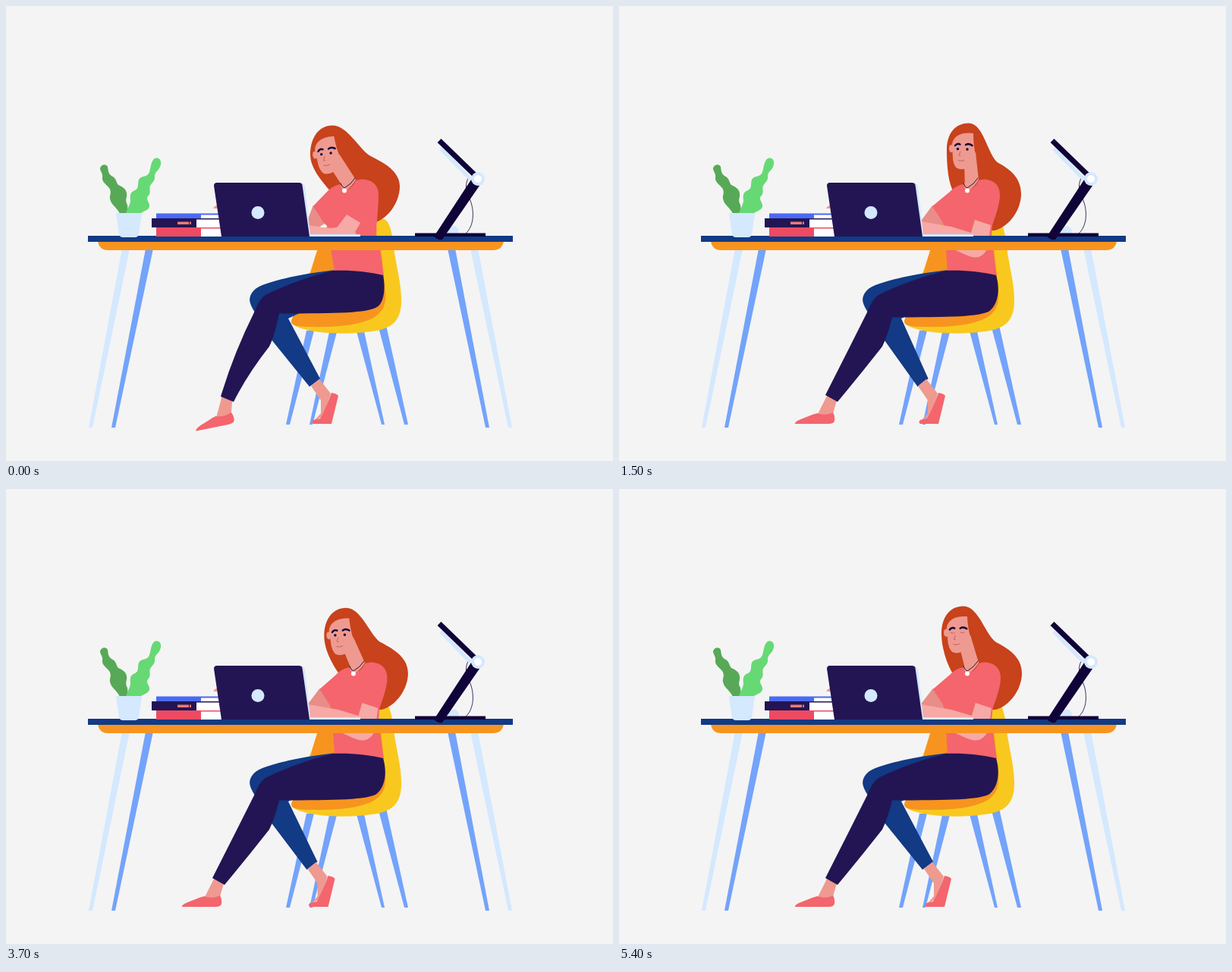
Animation of 800x600 px, one loop 5.5 s. Source, as an HTML page:

```html
<!DOCTYPE html>
<html lang="en">
<head>
<meta charset="utf-8">
<title>Working at a desk</title>
<style>
  html, body { margin: 0; width: 100%; height: 100%; overflow: hidden; background: #f4f4f4; }
  svg { display: block; width: 100vw; height: 100vh; }
  .navy { fill: #231553; }
  .ink { fill: #0f0338; }
  .blue { fill: #123a85; }
  .sky { fill: #73a3fb; }
  .pale { fill: #d4e8fe; }
  .orange { fill: #f7941f; }
  .yellow { fill: #f9c81f; }
  .coral { fill: #f4656d; }
  .skin { fill: #ee9a90; }
  .shade { fill: #e88d87; }
  .light { fill: #f6a9a6; }
  .hair { fill: #c8421b; }
  .white { fill: #fff; }
  .line { fill: none; stroke: #0f0338; stroke-linecap: round; }
  .thin { fill: none; stroke: #c0605f; stroke-width: .9; stroke-linecap: round; }
</style>
</head>
<body>
<svg viewBox="0 0 800 600">
  <!-- chair -->
  <g class="sky">
    <path d="M396 428H406L374 552H369Z"/>
    <path d="M426 430H436L404 552H400Z"/>
    <path d="M462 429H472L499 552H495Z"/>
    <path d="M491 424L501 421L530 552H525Z"/>
  </g>
  <path class="yellow" d="M497 281C506 282 509 300 511 318C514 342 521 365 521 388C521 412 512 423 490 428C460 433 420 433 396 427C384 424 377 421 376 416L425 286L470 280Z"/>
  <path class="orange" d="M426 284C418 300 408 325 402 350L381 405Q374 415 377 419Q381 423 400 423C440 424 470 420 486 410C498 402 501 392 500 378L494 318L440 290Z"/>

  <!-- woman -->
  <path class="hair" id="hair"/>
  <path class="blue" id="backLeg"/>
  <g id="backFoot">
    <path class="skin" d="M402 501L413 492L428 511L419 540L405 548L415 537V520Z"/>
    <path class="coral" d="M429 510Q436 511 438 514L429 551H405Q402 549 405 546L414 544Q422 530 429 510Z"/>
  </g>
  <path class="skin" id="neck"/>
  <path class="shade" id="farArm"/>
  <path class="coral" id="shirt"/>
  <path class="skin" id="collar"/>
  <path class="light" id="nearArm"/>
  <g id="frontFoot">
    <path class="skin" d="M-6 -4L7 2L1 23Q-9 28 -18 20Z"/>
    <path class="coral" d="M-48 33Q-49 30 -38 26C-28 22 -23 20 -19 19Q-8 23 2 18Q5 23 4 29Q3 33 -4 33Z"/>
  </g>
  <path class="navy" id="frontLeg"/>
  <g id="head">
    <ellipse class="skin" cx="-15" cy="0" rx="3" ry="5"/>
    <path class="skin" d="M14 -20C0 -22 -12 -18 -14 -6L-13 14Q-11 27 -4 27Q3 28 10 23L17 8Q14 -4 14 -20Z"/>
    <path class="line" stroke-width="2.4" d="M-10 -4Q-7 -7.5 -3.5 -5.5M4 -5Q8 -7.5 12.5 -4"/>
    <g id="open" class="ink"><circle cx="-6.500" cy="0.500" r="1.700"/><circle cx="6" cy="1" r="1.700"/></g>
    <path id="shut" class="thin" d="M-9 0Q-7 1.500 -4 .5M4 .5Q6 2 9 .5"/>
    <path class="thin" d="M-3 4L-5 9L-3 9.500M-6 15.500Q-2 17.500 2 15.500"/>
  </g>
  <g id="pendant">
    <path class="line" stroke-width=".9" d="M-5 -6Q-3 -1 0 0Q9 -5 14 -13"/>
    <circle class="white" r="3" cy="3.500"/>
  </g>

  <!-- table -->
  <g class="pale">
    <path d="M153 320H163L114 556H109Z"/>
    <path d="M612 320H622L667 556H662Z"/>
  </g>
  <g class="sky">
    <path d="M184 320H194L144 556H139Z"/>
    <path d="M582 320H592L637 556H632Z"/>
  </g>
  <path class="orange" d="M121 310H656Q654 322 642 322H134Q123 322 121 310Z"/>
  <path class="blue" d="M108 303H668V311H108Z"/>

  <!-- plant -->
  <path fill="#58a957" d="M150 274C147 266 138 262 137 254C136 249 140 246 136 240C132 235 126 232 127 226C128 222 125 219 124 215C124 209 132 207 134 212C135 217 134 220 139 224C146 227 145 233 148 236C152 238 158 240 159 247C160 253 156 256 160 262L161 274Z"/>
  <path fill="#66d974" d="M158 274C160 266 164 262 164 256C163 250 164 245 170 243C176 240 173 234 175 229C178 223 185 226 188 221C191 217 190 205 196 201C203 199 206 205 203 212C201 217 196 219 196 224C197 231 192 233 190 237C188 241 192 246 187 251C184 254 188 258 189 262C190 269 182 270 176 274Z"/>
  <path class="pale" d="M145 273H179L175 301Q174 305 170 305H154Q150 305 149 301Z"/>

  <!-- books -->
  <path class="white" d="M250 275H286V304H250Z"/>
  <path fill="#4a6af5" d="M198 273.500H286V275.500H257V280.500H198Z"/>
  <path class="navy" d="M192 280H286V281.500H251V292H192Z"/>
  <path fill="#f07a72" d="M226 284.500H241V288H226ZM242 284.500H244V288H242Z"/>
  <path fill="#ee4a62" d="M198 292H286V293.500H257V304H198Z"/>
  <path class="skin" d="M273 267Q276 262 281 262V267Z"/>

  <!-- laptop -->
  <path class="pale" d="M386 234H390Q393 234 394 238L401 301H467V304H390Z"/>
  <path class="navy" d="M278 233H386Q390 233 390.500 236L400 304H284L274 237Q274 233 278 233Z"/>
  <circle class="pale" cx="332" cy="272.500" r="8.500"/>

  <!-- lamp -->
  <path class="line" stroke-width=".8" d="M609 227Q605 235 607 244M611 254C618 270 617 290 606 300"/>
  <path class="pale" d="M581 300Q585 290 591 290Q597 292 597 300Z"/>
  <path class="ink" d="M539 299.500H632V304H539Z"/>
  <path class="ink" d="M564 304Q569 309 575 308L624 237L613 229Z"/>
  <path d="M573 188L612 228" stroke="#d4e8fe" stroke-width="5"/>
  <path d="M571 177.500L619 224" stroke="#0f0338" stroke-width="7"/>
  <circle class="pale" cx="622" cy="228" r="9"/>
  <circle class="white" cx="622" cy="228" r="5"/>
</svg>

<script>
const LOOP = 5500, STEP = 100, SHUT_AT = 4000;

// time, eyes x, eyes y, head tilt, neck x, lean, hair x, hair y, near arm, front foot, back foot
const KEYS = [
  [0,    422, 194,   -10, 447, -11, -11, -10, 0,  1,    0],
  [400,  438, 195,   -4,  453, -6,  -5,  -2,  0,  1.3,  -1.5],
  [1200, 452, 189,   -1,  459, -1,  -1,  -1,  .8, 1,    -6],
  [1500, 453, 188,   0,   460, 0,   0,   0,   1,  0,    -8],
  [2300, 441, 191.5, -8,  460, 0,   1,   -5,  0,  0,    -8],
  [3100, 439, 194,   -6,  458, 0,   -1,  -5,  1,  0,    -8],
  [4400, 443, 189,   -5,  460, 1,   1,   -5,  1,  0,    0],
  [5400, 446, 189,   -3,  460, 1,   1,   -5,  1,  0,    0]
];

const el = {};
document.querySelectorAll('[id]').forEach(n => el[n.id] = n);
const draw = (id, d) => el[id].setAttribute('d', d);
const place = (id, x, y, r = 0) =>
  el[id].setAttribute('transform', `translate(${x} ${y}) rotate(${r})`);

function slope(i, c) {
  const a = KEYS[i - 1], b = KEYS[i], d = KEYS[i + 1];
  if (!a || !d || (b[c] - a[c]) * (d[c] - b[c]) <= 0) return 0;
  const before = (b[c] - a[c]) / (b[0] - a[0]), after = (d[c] - b[c]) / (d[0] - b[0]);
  return 2 * before * after / (before + after);
}

// smooth curve through the keys without overshoot
function pose(t) {
  let i = 0;
  while (i < KEYS.length - 2 && t >= KEYS[i + 1][0]) i++;
  const a = KEYS[i], b = KEYS[i + 1], h = b[0] - a[0];
  const u = Math.min(1, (t - a[0]) / h), v = u * u * (3 - 2 * u);
  return a.map((from, c) => from + (b[c] - from) * v +
    h * u * (1 - u) * ((1 - u) * slope(i, c) - u * slope(i + 1, c))).slice(1);
}

function render(t) {
  const [ex, ey, tilt, nx, lean, hx, hy, arm, foot, back] = pose(t);
  const mix = (a, b) => a + (b - a) * arm;
  const rad = tilt * Math.PI / 180, cos = Math.cos(rad), sin = Math.sin(rad);
  const onHead = (x, y) => `${ex + x * cos - y * sin} ${ey + x * sin + y * cos}`;

  // hair: dome follows the head, tail follows the back
  const topX = ex + 8, topY = ey - 33.500 + tilt * .3;
  const tx = 495 + hx, ty = 296 + hy;
  const mx = (ex + 47 + tx + 5) / 2, my = ty - 89;
  draw('hair', `M${topX} ${topY}
    C${topX - 18} ${topY} ${ex - 21} ${ey - 20} ${ex - 21} ${ey + 2}
    C${ex - 21} ${ey + 22} ${nx - 26} 236 ${nx - 18} 246
    L${nx + 20} 270 L${tx - 8} ${ty} L${tx} ${ty}
    C${tx + 20} ${ty - 5} ${tx + 35} ${ty - 28} ${tx + 35} ${ty - 48}
    C${tx + 35} ${ty - 70} ${mx + 15} ${my + 8} ${mx} ${my}
    C${mx - 14} ${my - 9} ${topX + 20} ${topY} ${topX} ${topY}Z`);
  place('head', ex, ey, tilt);
  el.open.style.display = t < SHUT_AT ? '' : 'none';
  el.shut.style.display = t < SHUT_AT ? 'none' : '';

  draw('neck', `M${onHead(2, 20)} L${nx - 4} 237 L${nx} 246 L${nx + 14} 229 L${onHead(17, 5)}Z`);
  draw('collar', `M${nx - 6} 236 Q${nx - 4} 243 ${nx} 243 Q${nx + 10} 238 ${nx + 14} 228 L${nx + 8} 226 L${nx - 4} 232Z`);
  place('pendant', nx - 1, 240);

  // torso and arms
  const hemX = 413 + lean * .75;
  draw('shirt', `M${nx - 7} 235 Q${nx - 18} 238 ${nx - 24} 245 L${hemX} 264
    L${hemX + 14} 286 L${430 + lean * .2} 294 L${431 + lean * .25} 322 L433 350 L498 356
    L493 322 L${491 + lean * .25} 303 L${mix(495, 492) + lean * .6} 289 Q${502 + lean} 262 ${502 + lean} 250
    Q${502 + lean} 231 ${483 + lean} 228.500 Q${478 + lean} 228 ${nx + 14} 230
    Q${nx + 10} 240 ${nx} 243Z`);
  draw('farArm', `M${hemX} 263 L${hemX + 15} 287 L${hemX + 6} 293 L398 296 L396 286Z`);
  const w = lean * .9;
  draw('nearArm', `M${mix(459, 469) + w} ${mix(275, 282)}
    L${mix(477, 490) + w} ${mix(286, 289)}
    L${mix(470, 486) + w} ${mix(298, 318)}
    Q${mix(465, 480)} ${mix(303, 334)} ${mix(450, 465)} ${mix(303, 331)}
    Q${mix(444, 455)} ${mix(303, 328)} 438 ${mix(303, 319)}
    L398 ${mix(303, 301)} V${mix(289, 284)}
    L${mix(425, 438)} ${mix(293, 291)} L${mix(446, 464) + w} ${mix(292, 299)}Z`);

  // legs
  draw('backLeg', `M436 348 C395 352 360 360 338 368 C324 373 319 384 322 392
    C325 402 335 412 345 434 L${400 + back * .8} 502 L${414 + back * .8} 491.500
    L372 412 L480 362 L470 352Z`);
  place('backFoot', back, 0);
  const under = 410.500 - 5 * Math.min(1, foot), hip = 501 - 2 * foot;
  draw('frontLeg', `M432 349 C455 348 480 351 497 355
    C${hip + 2} 375 ${hip - 2} 394 488 ${under - 8}
    C475 ${under - 1} 440 ${under} 360 ${under}
    Q354 435 347 449 Q318 486 ${288 + 12 * foot} 522
    L${272 + 11 * foot} ${513 + 2 * foot} Q300 458 328 402
    Q334 386 342 381 C370 367 405 355 432 349Z`);
  place('frontFoot', 280 + 11 * foot, 518 + .5 * foot, -11.500 * foot);
}

const start = performance.now();
function tick() {
  const t = (performance.now() - start) % LOOP;
  render(Math.floor(t / STEP) * STEP);
  requestAnimationFrame(tick);
}
tick();
</script>
</body>
</html>
```
